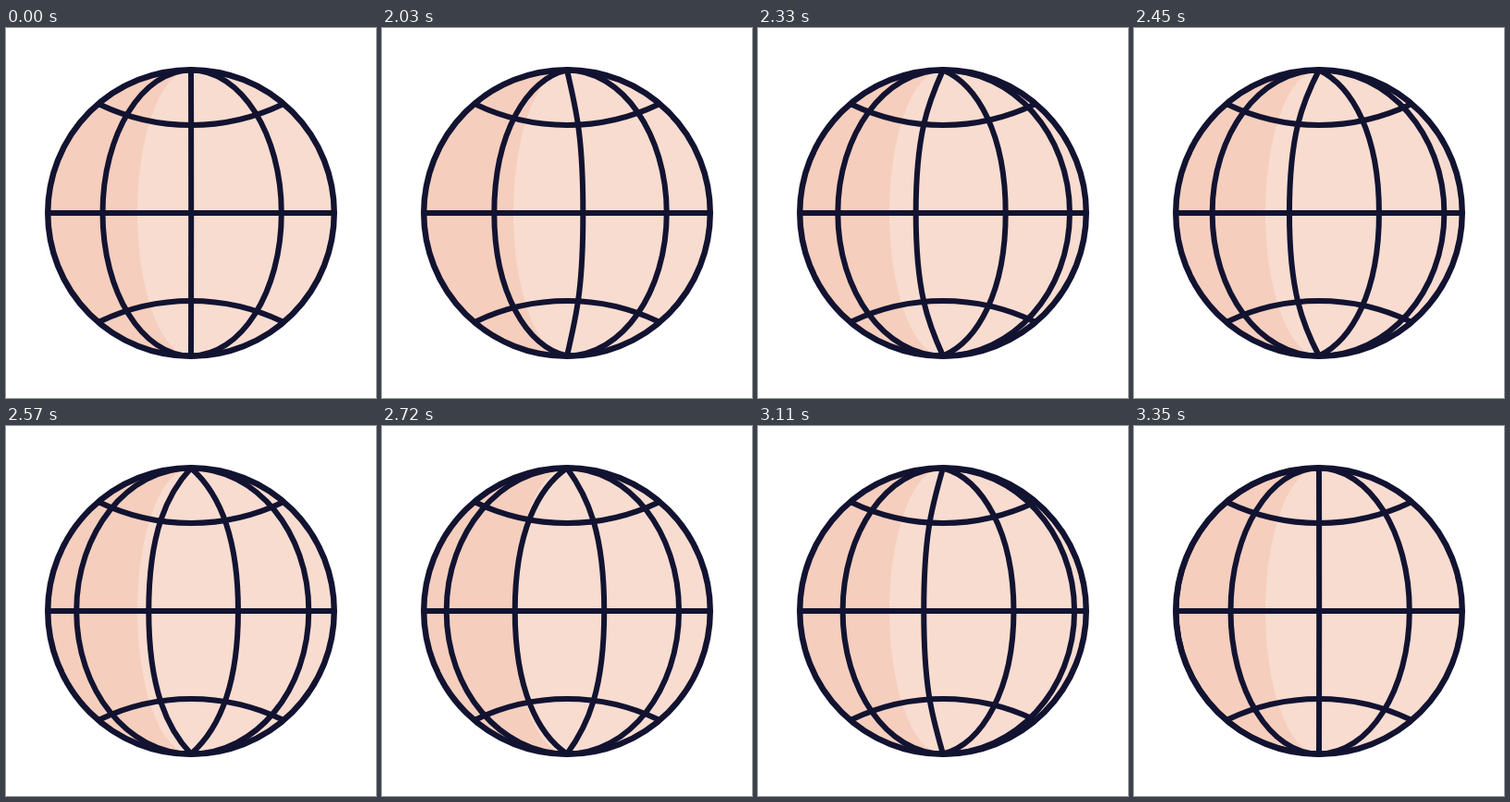
An HTML page for the animation above (3.44 s loop, 400 by 400 pixels).

```html
<!DOCTYPE html>
<html lang="en">
<head>
<meta charset="utf-8">
<title>Spinning globe</title>
<style>
  html, body { margin: 0; width: 100%; height: 100%; overflow: hidden; background: #fff; }
  svg { display: block; width: 100%; height: 100%; }
  .line { fill: none; stroke: #121331; stroke-width: 6; stroke-linecap: round; stroke-linejoin: round; }
</style>
</head>
<body>
<svg viewBox="0 0 400 400">
  <circle cx="200" cy="200" r="154.5" fill="#f8dcd0"/>
  <path fill="#f5cebd" d="M200 45.5A154.5 154.5 0 0 0 200 354.5A58 154.5 0 0 1 200 45.5Z"/>
  <g class="line">
    <circle cx="200" cy="200" r="154.8" stroke-width="6.4"/>
    <path d="M45.5 200H354.5M101 82.5A229 229 0 0 0 299 82.5M101 317.5A229 229 0 0 1 299 317.5"/>
  </g>
  <g class="line" id="meridians"></g>
</svg>
<script>
const LOOP = 3440, START = 2000, SPIN = 1350, STEP = 30, TURNS = 7;
const R = 154.5, K = 0.5523;

// Meridian stations from the left rim to the right rim
const bulge = [-R, -95.5, 0.2, 97.8, R];
// How far the pole handles dip: only the straight centre line has them
const dip = [0, 0, R / 3, 0, 0];

const group = document.getElementById('meridians');
const lines = [0, 1, 2, 3].map(() =>
  group.appendChild(document.createElementNS('http://www.w3.org/2000/svg', 'path')));

function bezier(x1, y1, x2, y2) {
  const at = (a, b, s) => 3 * (1 - s) * (1 - s) * s * a + 3 * (1 - s) * s * s * b + s * s * s;
  return t => {
    if (t <= 0) return 0;
    if (t >= 1) return 1;
    let lo = 0, hi = 1;
    for (let i = 0; i < 30; i++) {
      const mid = (lo + hi) / 2;
      if (at(x1, x2, mid) < t) lo = mid; else hi = mid;
    }
    return at(y1, y2, lo);
  };
}

const ease = bezier(0.167, 0.167, 0.461, 1);
const mix = (list, i, f) => list[i] + (list[i + 1] - list[i]) * f;

function meridian(i, f) {
  const x = mix(bulge, i, f), d = mix(dip, i, f);
  const mid = 200 + x, pole = 200 + K * x, top = 200 - R, bottom = 200 + R;
  return `M200 ${top}C${pole} ${top + d} ${mid} ${200 - K * R} ${mid} 200` +
         `C${mid} ${200 + K * R} ${pole} ${bottom - d} 200 ${bottom}`;
}

function draw(time) {
  const step = Math.floor((time % LOOP - START) / STEP);
  const turn = TURNS * ease(step * STEP / SPIN);
  const f = turn % 1;
  lines.forEach((line, i) => line.setAttribute('d', meridian(i, f)));
  // The first new meridian stays hidden until the spin is under way
  lines[0].style.display = turn < 0.2 ? 'none' : '';
}

const begin = performance.now();
function tick() {
  draw(performance.now() - begin);
  requestAnimationFrame(tick);
}
tick();
</script>
</body>
</html>
```
